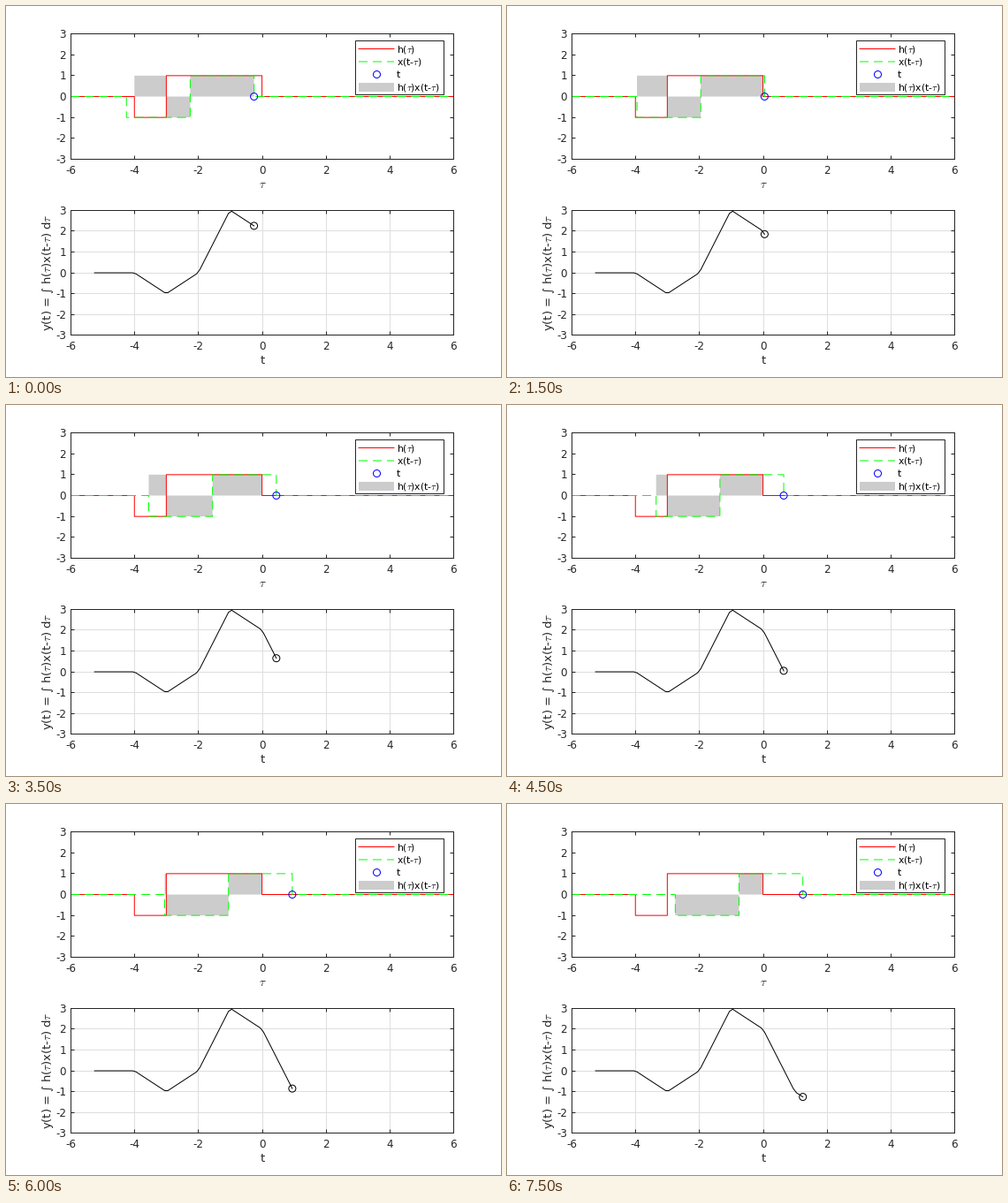
A matplotlib script that plays this animation: 560 px wide and 420 px high, repeating every 8000 ms.

```python
import matplotlib.pyplot as plt
import numpy as np
from matplotlib.animation import FuncAnimation
from matplotlib.patches import Circle, Ellipse, Polygon, Rectangle
from matplotlib.transforms import Affine2D

W, H, DPI = 560, 420, 70
PX = 72 / DPI  # one pixel in points
FRAMES, INTERVAL = 16, 500
T_FIRST, T_START, STEP = -5.25, -0.25, 0.1
INK, SHADE = "#262626", "0.8"
RED, GREEN, BLUE = "#ff0000", "#00ff00", "#0000ff"
DASH = (0, (10, 6))

plt.rcParams.update({
    "font.family": "DejaVu Sans",
    "mathtext.fontset": "cm",
    "lines.linewidth": PX,
    "lines.dash_capstyle": "butt",
    "axes.linewidth": PX,
    "axes.edgecolor": INK,
})


def h(tau):
    return np.where((tau > -4) & (tau < -3), -1, 0) + np.where((tau > -3) & (tau < 0), 1, 0)


def x(s):
    return np.where((s > 0) & (s < 2), 1, 0) - np.where((s > 2) & (s < 4), 1, 0)


def y(t):
    """Convolution of h and x, linear between whole numbers."""
    return np.interp(t, [-4, -3, -2, -1, 0, 1, 2], [0, -1, 0, 3, 2, -1, -2])


def stairs(edges, values):
    """Corner points of a step function that is zero outside the edges."""
    xs = np.repeat(edges, 2)
    ys = np.concatenate([[0], np.repeat(values, 2), [0]])
    return xs, ys


def make_axes(top, bottom, left=73.1, right=506.1):
    ax = fig.add_axes([left / W, 1 - bottom / H, (right - left) / W, (bottom - top) / H])
    ax.set(xlim=(-6, 6), ylim=(-3, 3))
    ax.set_xticks(range(-6, 7, 2), [str(v) for v in range(-6, 7, 2)])
    ax.set_yticks(range(-3, 4), [str(v) for v in range(-3, 4)])
    ax.tick_params(direction="in", top=True, right=True, length=4 * PX, width=PX,
                   color=INK, labelcolor=INK, labelsize=12 * PX)
    ax.tick_params(axis="x", pad=7 * PX)
    ax.tick_params(axis="y", pad=5 * PX)
    ax.set_axisbelow(True)
    return ax


def smooth(ax):
    """Settings for data drawn between pixels, centred on the pixel rows."""
    return dict(transform=ax.transData + Affine2D().translate(0, -0.5), snap=False)


def ring(ax, color):
    box = ax.get_window_extent()
    mark = Ellipse((0, 0), 8 * 12 / box.width, 8 * 6 / box.height,
                   fill=False, ec=color, lw=PX, zorder=4, **smooth(ax))
    return ax.add_patch(mark)


def label(px, py, text, size, color=INK, **kw):
    page.text(px, py, text, fontsize=size * PX, color=color, va="baseline", **kw)


fig = plt.figure(figsize=(W / DPI, H / DPI), dpi=DPI, facecolor="white")
upper = make_axes(31.05, 172.95)
lower = make_axes(230.65, 372.45)
lower.grid(True, color="#dedede", lw=PX)

# Signals
shade = upper.add_patch(Polygon([(0, 0), (0, 0)], fc=SHADE, ec="none", lw=0,
                                zorder=1, **smooth(upper)))
hx, hy = stairs([-4, -3, 0], [-1, 1])
upper.plot(np.r_[-6, hx, 6], np.r_[0, hy, 0], color=RED, **smooth(upper))
x_line, = upper.plot([], [], color=GREEN, ls=DASH, **smooth(upper))
t_mark = ring(upper, BLUE)

# Result
y_line, = lower.plot([], [], color="black", **smooth(lower))
y_mark = ring(lower, "black")

# Labels and legend, in pixels
page = fig.add_axes([0, 0, 1, 1], xlim=(0, W), ylim=(H, 0), zorder=5)
page.axis("off")
label(290, 206, r"$\tau$", 13.2, ha="center")
label(290, 405, "t", 13.2, ha="center")
label(51.5, 302, r"y(t) = ∫ h($\tau$)x(t-$\tau$) d$\tau$", 13.2,
      ha="center", rotation=90, rotation_mode="anchor")

page.add_patch(Rectangle((395, 39), 100, 61, fc="white", ec=INK, lw=PX))
rows = [48.5, 63, 77.5, 92]
page.plot([399, 439], [rows[0]] * 2, color=RED, snap=False)
page.plot([399, 439], [rows[1]] * 2, color=GREEN, ls=DASH, snap=False)
page.add_patch(Circle((419.5, rows[2]), 4, fill=False, ec=BLUE, lw=PX))
page.add_patch(Rectangle((399, rows[3] - 5), 40, 10, fc=SHADE, ec="none", lw=0))
names = [r"h($\tau$)", r"x(t-$\tau$)", "t", r"h($\tau$)x(t-$\tau$)"]
for row, name in zip(rows, names):
    label(442, row + 3.5, name, 10.8, "black")


def update(i):
    t = T_START + STEP * i
    xs, ys = stairs([t - 4, t - 2, t], [-1, 1])
    x_line.set_data(np.r_[-6, xs, 6], np.r_[0, ys, 0])

    edges = np.sort([-4, -3, 0, t - 4, t - 2, t])
    mid = (edges[:-1] + edges[1:]) / 2
    shade.set_xy(np.column_stack(stairs(edges, h(mid) * x(t - mid))))
    t_mark.center = (t, 0)

    ts = np.linspace(T_FIRST, t, round((t - T_FIRST) / STEP) + 1)
    y_line.set_data(ts, y(ts))
    y_mark.center = (t, float(y(t)))
    return shade, x_line, t_mark, y_line, y_mark


anim = FuncAnimation(fig, update, frames=FRAMES, interval=INTERVAL, repeat=True, blit=False)
plt.show()
```
